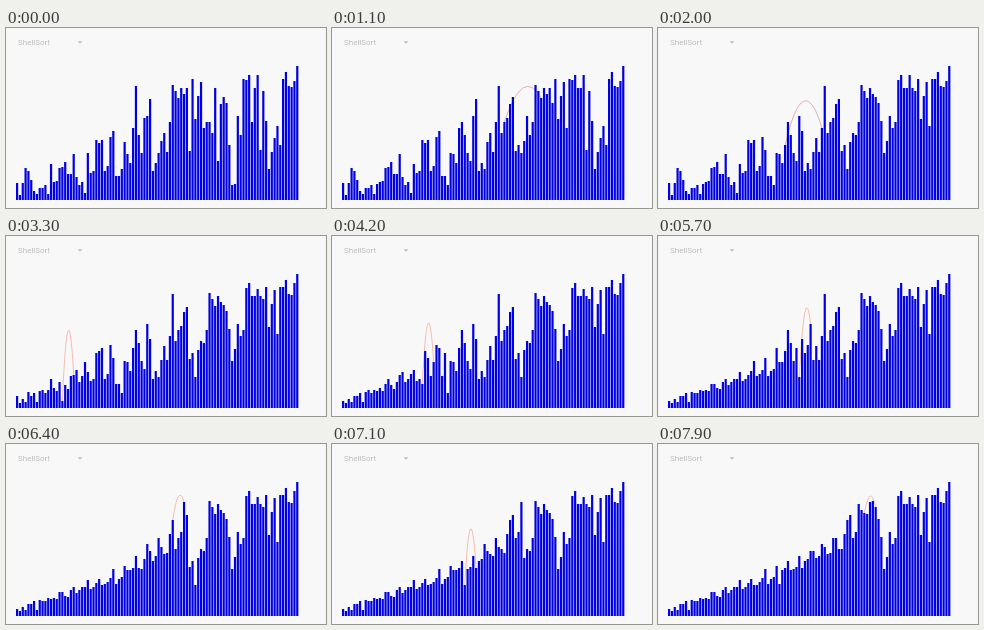
These frames come from a looping animation (320 by 180 pixels, 8000 ms). An HTML page:

```html
<!DOCTYPE html>
<html lang="en">
<head>
<meta charset="utf-8">
<title>ShellSort</title>
<style>
  html, body { margin: 0; width: 100%; height: 100%; overflow: hidden; background: #f8f8f8; }
  svg { display: block; width: 100vw; height: 100vh; }
  text { font: 8px Roboto, Arial, sans-serif; fill: #bdbdbd; }
</style>
</head>
<body>
<svg viewBox="0 0 320 180">
  <text x="12" y="17">ShellSort</text>
  <path d="M71.6 13.2h4.8l-2.4 2.5z" fill="#bdbdbd"/>
  <path id="arc" fill="none" stroke-width="0.7"/>
  <path id="bars" fill="#0000e2"/>
</svg>
<script>
const LOOP = 8000, TICK = 100;
const LEFT = 10, PITCH = 2.83, BAR = 2.2, FLOOR = 172, CEILING = 38;
const ARC_COLORS = { 13: '#de8f98', 4: '#f2a48f' };

// y of each bar's top; a smaller number is a taller bar
const START = [
  155, 167, 155, 140, 143, 152, 163, 166, 160, 160, 157, 166, 136,
  154, 153, 140, 139, 134, 146, 146, 126, 149, 157, 154, 165, 125,
  145, 143, 112, 115, 112, 143, 138, 109, 103, 148, 148, 141, 114,
  126, 135, 100, 58, 107, 125, 90, 88, 71, 143, 135, 125, 113,
  105, 124, 94, 57, 63, 70, 60, 66, 60, 123, 51, 91, 68,
  54, 100, 94, 94, 105, 60, 133, 76, 69, 75, 117, 157, 156,
  88, 107, 51, 52, 47, 94, 60, 47, 122, 63, 93, 141, 124,
  110, 98, 117, 51, 44, 58, 59, 53, 38
];

function swap(tops, lo, hi) {
  [tops[lo], tops[hi]] = [tops[hi], tops[lo]];
}

function recordPass(tops, gap, first, swaps) {
  for (let pivot = first; pivot < tops.length; pivot++) {
    for (let lo = pivot - gap; lo >= 0 && tops[lo] < tops[lo + gap]; lo -= gap) {
      swap(tops, lo, lo + gap);
      swaps.push({ gap, pivot, lo });
    }
  }
}

const swaps = [];
const sorted = START.slice();
recordPass(sorted, 13, 68, swaps);
recordPass(sorted, 4, 4, swaps);

// Pacing: [time, gap, pivot, lower index of the swap finished then]
const pacing = [
  [1100, 13, 83, 57], [2000, 13, 93, 41], [3300, 4, 24, 16],
  [5000, 4, 45, 41], [6400, 4, 59, 55], [7900, 4, 73, 69]
].map(([time, gap, pivot, lo]) => ({
  time,
  count: 1 + swaps.findIndex(s => s.gap === gap && s.pivot === pivot && s.lo === lo)
}));
pacing.unshift({ time: 0, count: 0 });

function swapCount(time) {
  const i = Math.max(1, pacing.findIndex(p => p.time >= time));
  const a = pacing[i - 1], b = pacing[i];
  return Math.round(a.count + (b.count - a.count) * (time - a.time) / (b.time - a.time));
}

const arc = document.getElementById('arc');
const bars = document.getElementById('bars');
const barLeft = i => LEFT + i * PITCH;
const barMiddle = i => barLeft(i) + BAR / 2;

function arcPath(tops, { lo, gap }) {
  const hi = lo + gap;
  const x1 = barMiddle(lo), x2 = barMiddle(hi);
  return `M${x1} ${tops[lo]}Q${(x1 + x2) / 2} ${CEILING} ${x2} ${tops[hi]}`;
}

function render(time) {
  const count = swapCount(Math.floor(time / TICK) * TICK);
  const tops = START.slice();
  for (const { lo, gap } of swaps.slice(0, count)) swap(tops, lo, lo + gap);

  bars.setAttribute('d', tops.map((y, i) =>
    `M${barLeft(i).toFixed(2)} ${FLOOR}V${y}h${BAR}V${FLOOR}z`).join(''));

  const last = swaps[count - 1];
  arc.setAttribute('d', last ? arcPath(tops, last) : '');
  if (last) arc.setAttribute('stroke', ARC_COLORS[last.gap]);
}

const begin = performance.now();
function loop() {
  render((performance.now() - begin) % LOOP);
  requestAnimationFrame(loop);
}
loop();
</script>
</body>
</html>
```
